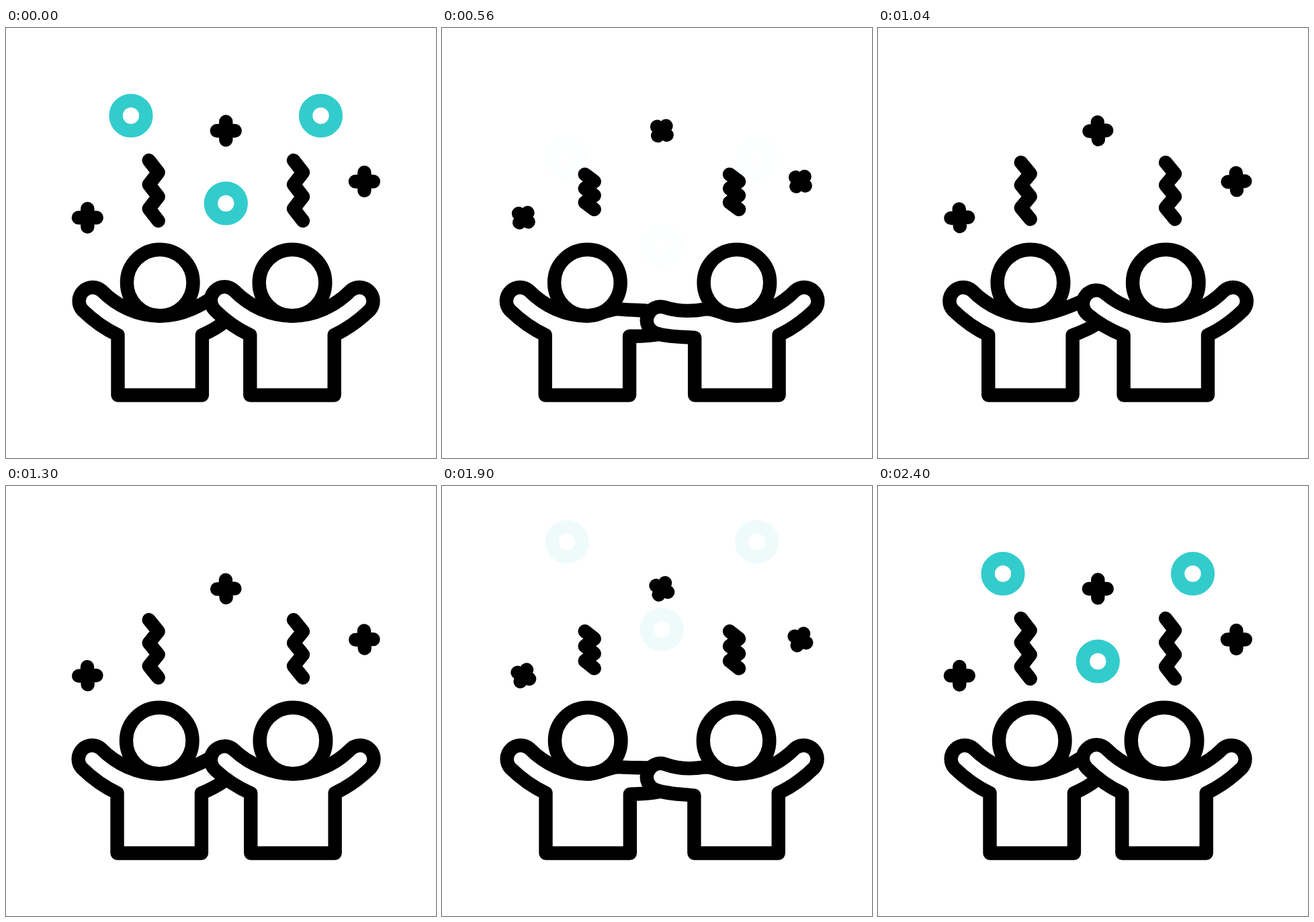
Animation of 640x640 px, one loop 2.42 s. Source, as an HTML page:

```html
<!DOCTYPE html>
<html lang="en">
<head>
<meta charset="utf-8">
<title>Celebration</title>
<style>
  html, body { margin: 0; width: 100%; height: 100%; overflow: hidden; background: #fff; }
  svg { display: block; width: 100%; height: 100%; }
</style>
</head>
<body>
<svg viewBox="0 0 640 640">
  <g fill="none" stroke="#000" stroke-width="20.4" stroke-linecap="round" stroke-linejoin="round">
    <g id="rings" stroke="#33cccc">
      <circle cx="186" cy="130.5" r="22.4"/>
      <circle cx="468.5" cy="130.5" r="22.4"/>
      <circle cx="327.3" cy="261" r="22.4"/>
    </g>
    <path id="crosses"/>
    <path id="streamers"/>
    <g transform="matrix(-1 0 0 1 655.2 0)">
      <path id="leftBody"/>
      <circle class="head" cy="379" r="49.3"/>
    </g>
    <path id="rightBody" fill="#fff"/>
    <circle class="head" cy="379" r="49.3"/>
  </g>
</svg>
<script>
const LOOP = 2420, STEP = 20;
const $ = id => document.getElementById(id);
const heads = document.querySelectorAll('.head');

// [time, value] steps, eased smoothly in between
const tracks = {
  sway:    [[0, 0], [600, 1], [1200, 0], [1800, 1], [2400, 0]],
  squash:  [[0, 0], [600, 1], [1180, 0], [1785, 1], [2400, 0]],
  turn:    [[0, 0], [1185, 1], [2370, 0]],
  fade:    [[0, 1], [600, 0], [1800, 0], [2400, 1]],
  ringOut: [[0, 0], [600, 64]],
  ringIn:  [[1800, -51.3], [2400, 0]]
};

const mix = (a, b, k) => a + (b - a) * k;
const smooth = x => x * x * (3 - 2 * x);

function at(track, t) {
  const i = track.findIndex(key => key[0] > t);
  if (i < 0) return track[track.length - 1][1];
  if (i === 0) return track[0][1];
  const [t0, a] = track[i - 1], [t1, b] = track[i];
  return mix(a, b, smooth((t - t0) / (t1 - t0)));
}

function cross(x, y, u) {
  const a = 13.45 * u, b = 13.45 * (1 - u);
  return `M${x + a} ${y - b}L${x - a} ${y + b}M${x + b} ${y + a}L${x - b} ${y - a}`;
}

function streamer(x, k) {
  const top = 197 + 21.2 * k, bottom = 287 - 17.2 * k;
  let d = '';
  for (let i = 0; i < 6; i++) {
    d += `${i ? 'L' : 'M'}${x + (i % 2) * 14} ${mix(top, bottom, i / 5)}`;
  }
  return d;
}

// Torso, outer arm and neckline up to the inner shoulder
function torso(c, k, corner) {
  return `${c - 62.7} ${corner}V546.5H${c + 62.7}V457` +
    `C${c + 84} 447 ${c + 103} 432 ${c + 115.4} 419.9` +
    `A20.4 20.4 0 0 0 ${c + 86.6} 391.1` +
    `C${c + 64} 414 ${c + 33} 428.5 ${c} 428.5` +
    `C${c - 16.5} 428.5 ${c - 32.3} ${mix(424.9, 417, k)} ${c - 47.2} 418.4`;
}

function frontBody(c, k) {
  const hx = 325.2, hy = mix(405.5, 435.5, k), r = 20.4;
  const a = mix(45, 18, k) * Math.PI / 180;
  const dx = Math.cos(a), dy = Math.sin(a);
  const ux = hx + r * dy, uy = hy - r * dx;
  const lx = hx - r * dy, ly = hy + r * dx;
  const corner = mix(457, 461, k);
  return 'M' + torso(c, k, corner) +
    `C${c - mix(61.9, 70, k)} ${mix(411.9, 423, k)} ${ux + 16 * dx} ${uy + 16 * dy} ${ux} ${uy}` +
    `A${r} ${r} 0 0 0 ${lx} ${ly}` +
    `C${lx + 17 * dx} ${ly + 17 * dy} ${c - 84} ${mix(447, 459.5, k)} ${c - 62.7} ${corner}Z`;
}

// The inner arm runs behind the neighbour, so it stays open
function backBody(c, k) {
  const corner = mix(457, 458.7, k);
  return `M330.2 ${mix(437.5, 456, k)}` +
    `C${mix(338, 345, k)} ${mix(444, 458.5, k)} ${c - 77} ${mix(450.6, 459, k)} ` +
    torso(c, k, corner) +
    `C${c - 61.9} ${mix(411.9, 420, k)} ${mix(358, 365, k)} ${mix(408, 420, k)} 351.2 ${mix(403.5, 420.8, k)}`;
}

function draw(time) {
  const t = Math.floor((time % LOOP) / STEP) * STEP;
  const k = at(tracks.sway, t), squash = at(tracks.squash, t), turn = at(tracks.turn, t);
  const c = 426 + 13 * k;
  heads.forEach(head => head.setAttribute('cx', c));
  $('leftBody').setAttribute('d', backBody(c, k));
  $('rightBody').setAttribute('d', frontBody(c, k));
  $('streamers').setAttribute('d', streamer(212.7, squash) + streamer(428, squash));
  $('crosses').setAttribute('d',
    cross(327.3, 153, turn) + cross(533.4, 228.5, turn) + cross(121.3, 282.3, turn));
  const drop = at(t < 1200 ? tracks.ringOut : tracks.ringIn, t);
  $('rings').setAttribute('transform', `translate(0 ${drop})`);
  $('rings').setAttribute('opacity', at(tracks.fade, t));
}

const start = performance.now();
function tick() {
  draw(performance.now() - start);
  requestAnimationFrame(tick);
}
tick();
</script>
</body>
</html>
```
